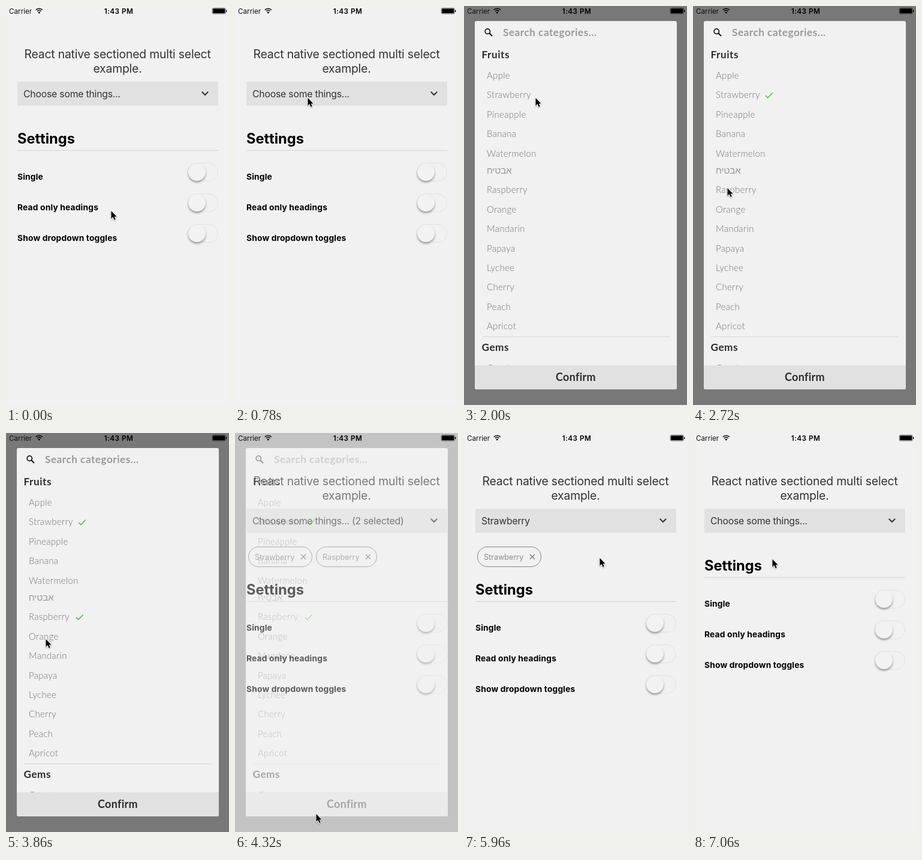
An HTML page with a canvas for the animation above (7.08 s loop, 372 by 664 pixels).

```html
<!DOCTYPE html>
<html lang="en">
<head>
<meta charset="utf-8">
<title>Sectioned multi select</title>
<style>
html, body { margin: 0; width: 100%; height: 100%; overflow: hidden; background: #f1f1f1; }
canvas { display: block; }
</style>
</head>
<body>
<canvas id="stage" width="372" height="664"></canvas>
<script>
const W = 372, H = 664, LOOP = 7080;
const stage = document.getElementById('stage').getContext('2d');
const sheet = document.createElement('canvas');
sheet.width = W;
sheet.height = H;
const layer = sheet.getContext('2d');

const UI = 'Inter, "Liberation Sans", sans-serif';
const LIST = 'Lato, "Open Sans", sans-serif';
const HEBREW = '"Liberation Sans", "DejaVu Sans", sans-serif';

const FRUITS = ['Apple', 'Strawberry', 'Pineapple', 'Banana', 'Watermelon', 'אבטיח', 'Raspberry',
  'Orange', 'Mandarin', 'Papaya', 'Lychee', 'Cherry', 'Peach', 'Apricot'];
const GEMS = ['Quartz', 'Zircon', 'Sapphire', 'Topaz'];

// Moments at which the state changes, in ms
const T = {
  fadeIn: 1280, fadeInEnd: 1620, grow: 1630,
  pick1: 2260, pick2: 3260,
  fadeOut: 4140, fadeOutEnd: 4450,
  drop2: 5660, drop1: 6760
};

// Pointer path: time, x, y
const PATH = [
  [180, 175, 341], [600, 118, 125], [780, 121, 153],
  [1980, 121, 153], [2140, 86, 152],
  [2520, 86, 152], [2720, 57, 303],
  [3800, 57, 303], [4080, 135, 634],
  [4960, 135, 634], [5160, 168, 211], [5320, 216, 206],
  [5700, 216, 206], [5960, 226, 208],
  [6280, 226, 208], [6560, 110, 204],
  [6820, 110, 204], [6980, 118, 205], [7060, 132, 210]
];

const smooth = u => u * u * (3 - 2 * u);
const ramp = (t, a, b) => smooth(Math.min(1, Math.max(0, (t - a) / (b - a))));
const within = (t, a, b) => t >= a && t < b;

function text(c, str, x, y, font, color, spacing = 0, align = 'left') {
  c.font = font;
  c.fillStyle = color;
  c.letterSpacing = spacing + 'px';
  c.textAlign = align;
  c.fillText(str, x, y);
}

function line(c, points, color, width) {
  c.beginPath();
  points.forEach(([x, y], i) => i ? c.lineTo(x, y) : c.moveTo(x, y));
  c.strokeStyle = color;
  c.lineWidth = width;
  c.stroke();
}

function pill(c, x, y, w, h, r) {
  c.beginPath();
  c.roundRect(x, y, w, h, r);
}

function statusBar(c) {
  text(c, 'Carrier', 5, 12.5, '400 11.7px ' + UI, '#111', 0);
  text(c, '1:43 PM', 188, 12.5, '600 11.8px ' + UI, '#000', 0.4, 'center');
  c.strokeStyle = '#000';
  c.lineWidth = 1.6;
  for (const r of [4.6, 7.8]) {
    c.beginPath();
    c.arc(55.3, 12, r, -Math.PI * 0.75, -Math.PI * 0.25);
    c.stroke();
  }
  c.fillStyle = '#000';
  c.beginPath();
  c.moveTo(55.3, 12.8);
  c.arc(55.3, 12.8, 2.8, -Math.PI * 0.75, -Math.PI * 0.25);
  c.fill();
  pill(c, 344.2, 3.5, 22, 9.5, 2);
  c.lineWidth = 0.6;
  c.stroke();
  pill(c, 345.2, 4.5, 20, 7.5, 1);
  c.fill();
  c.fillRect(367, 6.8, 1.3, 3.2);
}

function toggle(c, y) {
  pill(c, 303.5, y + 0.5, 50, 30, 15);
  c.strokeStyle = '#e3e3e3';
  c.lineWidth = 1;
  c.stroke();
  c.save();
  c.shadowColor = 'rgba(0,0,0,.36)';
  c.shadowBlur = 3.5;
  c.shadowOffsetY = 2.4;
  c.fillStyle = '#f2f2f2';
  c.beginPath();
  c.arc(318.5, y + 15.5, 14.5, 0, 7);
  c.fill();
  c.restore();
}

function chip(c, label, x, w, pressed) {
  pill(c, x + 0.5, 189.5, w - 1, 33, 16.5);
  c.strokeStyle = '#858585';
  c.lineWidth = 1;
  c.stroke();
  text(c, label, x + 11, 210.5, '400 12.7px ' + UI, '#8c8c8c', -0.05);
  const cx = x + w - 15, color = pressed ? '#d0d0d0' : '#777';
  line(c, [[cx - 4, 202], [cx + 4, 210]], color, 1.2);
  line(c, [[cx + 4, 202], [cx - 4, 210]], color, 1.2);
}

function page(c, t) {
  const first = within(t, T.pick1, T.drop1);
  const second = within(t, T.pick2, T.drop2);
  c.fillStyle = '#f1f1f1';
  c.fillRect(0, 0, W, H);

  const title = '400 19.4px ' + UI;
  text(c, 'React native sectioned multi select', 186, 87, title, '#333', -0.21, 'center');
  text(c, 'example.', 186, 111, title, '#333', -0.21, 'center');

  c.fillStyle = '#e1e1e1';
  c.fillRect(19, 126, 335, 40);
  const label = second ? 'Choose some things... (2 selected)'
    : first ? 'Strawberry' : 'Choose some things...';
  text(c, label, 29, 152, '400 15.8px ' + UI, '#333', -0.22);
  line(c, [[326.8, 142.8], [332, 148], [337.2, 142.8]], '#333', 2);

  if (first) chip(c, 'Strawberry', 22, 107, within(t, 6580, 6740));
  if (second) chip(c, 'Raspberry', 135, 102, within(t, 5500, 5640));

  const dy = first ? 40 : 0;
  text(c, 'Settings', 19, 229 + dy, '700 23.7px ' + UI, '#000', -0.02);
  c.fillStyle = '#d2d2d2';
  c.fillRect(19, 240 + dy, 335, 1);
  ['Single', 'Read only headings', 'Show dropdown toggles'].forEach((name, i) => {
    const y = 261 + dy + i * 51;
    text(c, name, 19, y + 28, '700 13.8px ' + UI, '#000', 0.16);
    toggle(c, y);
  });
}

function item(c, name, y, dim) {
  const hebrew = name === FRUITS[5];
  c.globalAlpha = dim ? 0.4 : 1;
  text(c, name, 38, y, hebrew ? '400 15px ' + HEBREW : '300 15px ' + LIST,
    hebrew ? '#959595' : '#727272', hebrew ? 0 : 0.3);
  c.globalAlpha = 1;
}

function check(c, x, y) {
  line(c, [[x, y], [x + 3.5, y + 3.7], [x + 11.5, y - 4.6]], '#4caf50', 1.5);
}

function modal(c, t) {
  const heading = '700 17.2px ' + LIST;
  c.clearRect(0, 0, W, H);
  c.fillStyle = 'rgba(0,0,0,.5)';
  c.fillRect(0, 0, W, H);
  c.save();
  pill(c, 18, 25, 337, 613, 3);
  c.clip();
  c.fillStyle = '#f1f1f1';
  c.fillRect(18, 25, 337, 613);

  c.beginPath();
  c.arc(39.3, 42.3, 4.1, 0, 7);
  c.strokeStyle = '#111';
  c.lineWidth = 1.7;
  c.stroke();
  line(c, [[42.3, 45.3], [47, 50]], '#111', 2);
  text(c, 'Search categories...', 65, 50, heading, '#999', 0.5);

  text(c, 'Fruits', 29.5, 87, heading, '#2c2c2c', 0.5);
  const count = t < T.grow ? 10 : FRUITS.length;
  FRUITS.slice(0, count).forEach((name, i) => {
    const y = 121 + i * 32.4 - (i === 5 ? 4 : i > 5 ? 4.1 : 0);
    const dim = i === 1 && within(t, 2140, T.pick1) || i === 6 && within(t, 3080, T.pick2);
    item(c, name, y, dim);
  });
  if (t >= T.pick1) check(c, 121.3, 149);
  if (t >= T.pick2) check(c, 117, 307);

  const top = count === 10 ? 420 : 550;
  c.fillStyle = '#d8d8d8';
  c.fillRect(30, top, 313, 1);
  text(c, 'Gems', 29.5, top + 24, heading, '#2c2c2c', 0.5);
  GEMS.forEach((name, i) => item(c, name, top + 58 + i * 32.5));

  c.fillStyle = '#e1e1e1';
  c.fillRect(18, 598, 337, 40);
  text(c, 'Confirm', 186.5, 624, '700 18px ' + LIST, '#2c2c2c', 0.3, 'center');
  c.restore();
}

function pointerAt(t) {
  let [, x, y] = PATH[0];
  for (let i = 1; i < PATH.length; i++) {
    const a = PATH[i - 1], b = PATH[i];
    if (t < a[0]) break;
    const u = ramp(t, a[0], b[0]);
    x = a[1] + (b[1] - a[1]) * u;
    y = a[2] + (b[2] - a[2]) * u;
  }
  return [x, y];
}

function pointer(c, [x, y]) {
  c.save();
  c.translate(Math.round(x) + 0.5, Math.round(y));
  c.scale(0.92, 0.92);
  c.beginPath();
  [[0, 0], [0, 14], [3.2, 11], [5.6, 16.3], [8, 15.2], [5.6, 10.2], [10, 10.2]]
    .forEach(([px, py]) => c.lineTo(px, py));
  c.closePath();
  c.lineJoin = 'round';
  c.shadowColor = 'rgba(0,0,0,.3)';
  c.shadowBlur = 2;
  c.shadowOffsetY = 1;
  c.strokeStyle = '#fff';
  c.lineWidth = 2;
  c.stroke();
  c.shadowColor = 'transparent';
  c.fillStyle = '#000';
  c.fill();
  c.restore();
}

function draw(t) {
  page(stage, t);
  const alpha = ramp(t, T.fadeIn, T.fadeInEnd) - ramp(t, T.fadeOut, T.fadeOutEnd);
  if (alpha > 0) {
    modal(layer, t);
    stage.globalAlpha = alpha;
    stage.drawImage(sheet, 0, 0);
    stage.globalAlpha = 1;
  }
  statusBar(stage);
  pointer(stage, pointerAt(t));
}

const start = performance.now();
function tick() {
  draw((performance.now() - start) % LOOP);
  requestAnimationFrame(tick);
}
tick();
</script>
</body>
</html>
```
